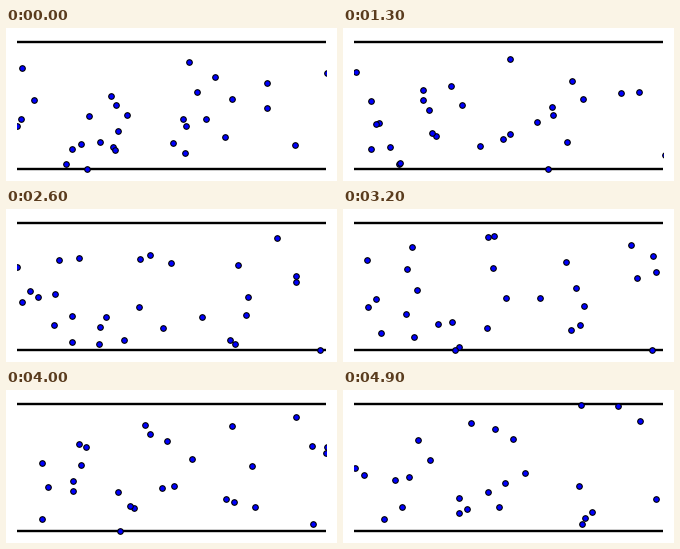
A matplotlib script that plays this animation: 331x153 px, repeating every 5000 ms.

```python
import numpy as np
import matplotlib.pyplot as plt
from matplotlib.animation import FuncAnimation

WIDTH, HEIGHT, DPI = 331, 153, 100
FRAMES, INTERVAL = 50, 100
LEFT, RIGHT = 11, 320
TOP, BOTTOM = 14.3, 140.5
STEP = 5.5  # spread of one random step, in pixels
PT = 72 / DPI

# Each particle: start x, start y, end x, end y
particles = np.array([
    (15, 39, 20, 84), (27, 71, 51, 90), (14, 90, 11, 77),
    (10, 97, 40, 128), (104, 67, 74, 49), (109, 76, 127, 32),
    (120, 86, 151, 38), (82, 87, 86, 69), (111, 102, 115, 107),
    (93, 113, 65, 86), (106, 118, 123, 118), (108, 121, 115, 123),
    (74, 115, 58, 116), (65, 120, -15, 112), (59, 135, -30, 125),
    (80, 140, 144, 101), (166, 114, 155, 116), (176, 90, 161, 92),
    (179, 97, 181, 82), (199, 90, 235, 95), (218, 108, 249, 121),
    (178, 124, 238, 133), (288, 116, 312, 108), (182, 33, 169, 48),
    (208, 48, 237, 14), (190, 63, 241, 127), (225, 70, 274, 15),
    (260, 54, 296, 30), (260, 79, 335, 80), (320, 44, 345, 60),
], dtype=float)


def brownian_paths(start, end, seed=4):
    """Random walks pinned at both ends and stopped by the walls."""
    rng = np.random.default_rng(seed)
    steps = rng.normal(0, STEP, (FRAMES, *start.shape))
    steps[0] = 0
    walk = steps.cumsum(axis=0)
    t = np.linspace(0, 1, FRAMES)[:, None, None]
    paths = start + t * (end - start) + walk - t * walk[-1]
    paths[..., 1] = paths[..., 1].clip(TOP, BOTTOM)
    return paths


paths = brownian_paths(particles[:, :2] + 0.5, particles[:, 2:] + 0.5)

fig = plt.figure(figsize=(WIDTH / DPI, HEIGHT / DPI), dpi=DPI, facecolor="white")
ax = fig.add_axes([LEFT / WIDTH, 0, (RIGHT - LEFT) / WIDTH, 1])
ax.set(xlim=(LEFT, RIGHT), ylim=(HEIGHT, 0))
ax.axis("off")

for wall in (TOP, BOTTOM):
    ax.plot([LEFT, RIGHT], [wall, wall], color="black", lw=2.4 * PT)

balls, = ax.plot([], [], "o", ms=5.6 * PT, mfc="blue", mec="black",
                 mew=1.1 * PT, zorder=3)


def update(frame):
    balls.set_data(*paths[frame].T)
    return balls,


anim = FuncAnimation(fig, update, frames=FRAMES, interval=INTERVAL,
                     repeat=True, repeat_delay=0)
plt.show()
```
